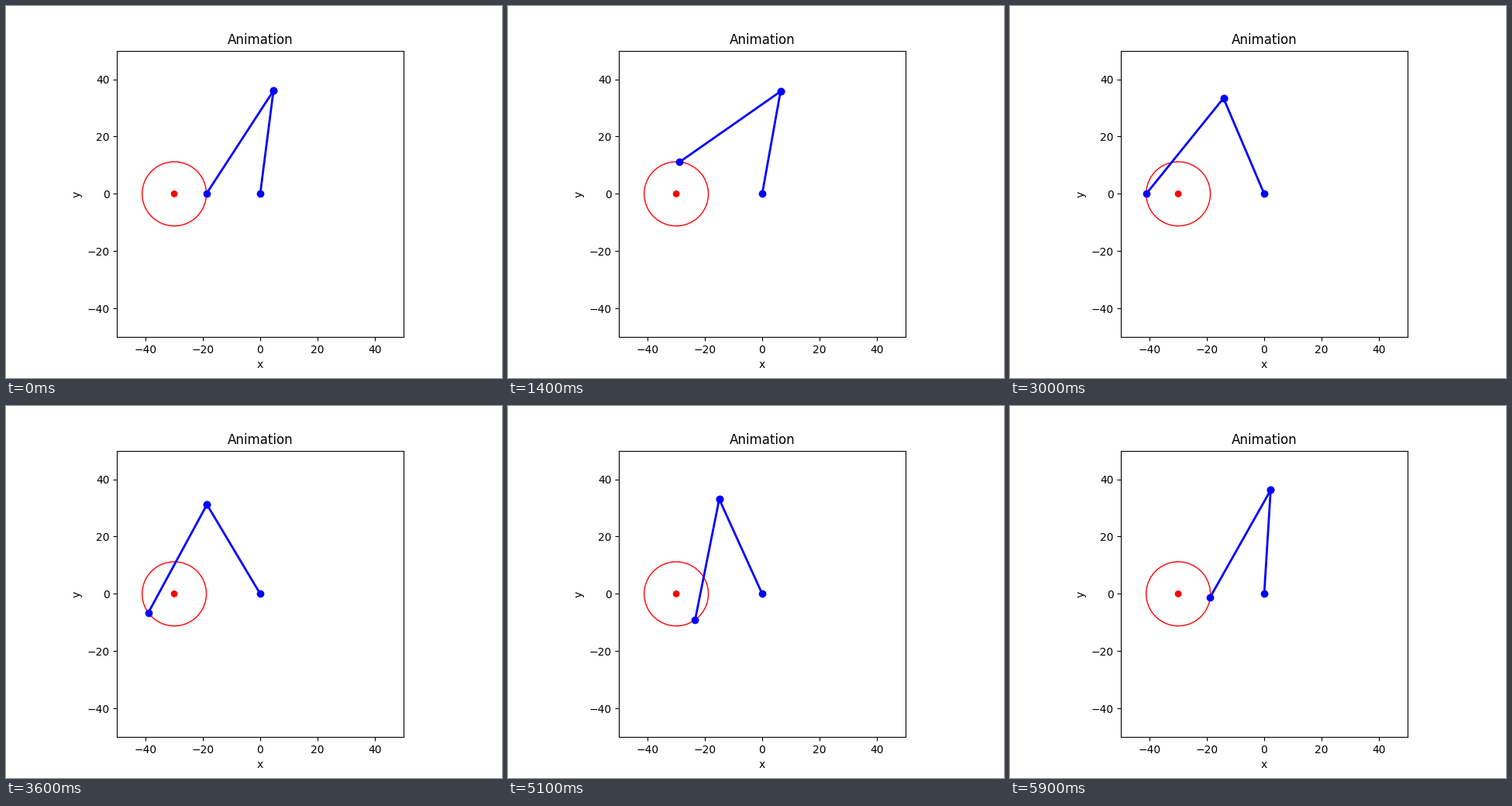
These frames come from a looping animation (640x480 px, 6000 ms). A matplotlib script:

```python
import numpy as np
import matplotlib.pyplot as plt
from matplotlib.animation import FuncAnimation

FRAMES = 60
INTERVAL = 100

CRANK, COUPLER, ROCKER = 11.2, 42.95, 36.3
MOTOR = np.array([-30.0, 0.0])
PIVOT = np.array([0.0, 0.0])


def crank_pin(angle):
    return MOTOR + CRANK * np.array([np.cos(angle), np.sin(angle)])


def knee(pin):
    """Upper point where the rocker and coupler circles meet."""
    span = pin - PIVOT
    dist = np.hypot(*span)
    ux, uy = span / dist
    along = (dist**2 + ROCKER**2 - COUPLER**2) / (2 * dist)
    height = np.sqrt(ROCKER**2 - along**2)
    return PIVOT + along * np.array([ux, uy]) + height * np.array([uy, -ux])


def set_bar(bar, start, end):
    bar.set_data([start[0], end[0]], [start[1], end[1]])


fig, ax = plt.subplots(figsize=(6.4, 4.8), dpi=100)
ax.set_aspect("equal")
ax.set_xlim(-50, 50)
ax.set_ylim(-50, 50)
ax.set_xlabel("x")
ax.set_ylabel("y")
ax.set_title("Animation")

ax.add_patch(plt.Circle(MOTOR, CRANK, fill=False, color="red"))
ax.add_patch(plt.Circle(MOTOR, 1, color="red"))
rocker, = ax.plot([], [], "o-", color="blue", lw=2)
coupler, = ax.plot([], [], "o-", color="blue", lw=2)


def update(frame):
    pin = crank_pin(2 * np.pi * frame / FRAMES)
    joint = knee(pin)
    set_bar(rocker, PIVOT, joint)
    set_bar(coupler, pin, joint)
    return rocker, coupler


anim = FuncAnimation(fig, update, frames=FRAMES, interval=INTERVAL,
                     repeat=True, repeat_delay=0)
plt.show()
```
